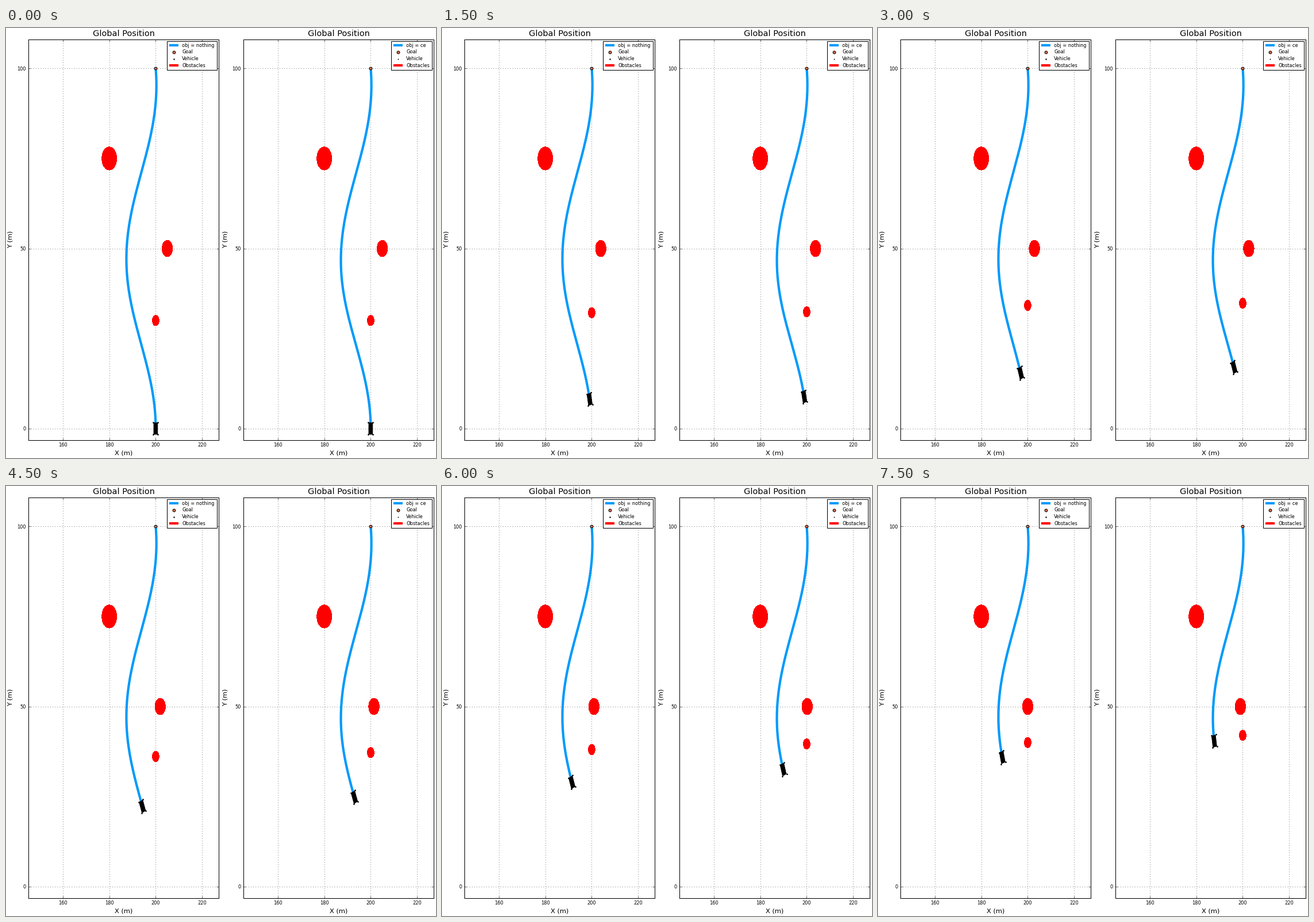
A matplotlib script that plays this animation: 748x748 px, repeating every 8 s.

```python
import numpy as np
import matplotlib.pyplot as plt
from matplotlib.animation import FuncAnimation
from matplotlib.patches import Circle, Polygon, Rectangle

SIZE = 748
FRAMES, STEP = 16, 500
LAST = (FRAMES - 1) * STEP
BLUE, ORANGE, RED = "#009afa", "#e36f47", "#ff0000"

plt.rcParams.update({
    "font.family": "DejaVu Sans",
    "font.size": 8,
    "lines.scale_dashes": False,
    "axes.linewidth": 1.0,
})

fig = plt.figure(figsize=(10, 10), dpi=SIZE / 10, facecolor="white")

# Overlay in pixel coordinates for text and legends
page = fig.add_axes([0, 0, 1, 1], zorder=5)
page.set(xlim=(0, SIZE), ylim=(SIZE, 0))
page.axis("off")


def label(x, y, text, size=8, ha="center", rotation=0):
    page.text(x, y, text, size=size, ha=ha, va="baseline",
              rotation=rotation, rotation_mode="anchor")


def marker(ax, x, y, size, zorder=3):
    ax.plot(x, y, "o", ms=size, mfc=ORANGE, mec="black", mew=1, zorder=zorder)


def legend(x, width, title, dot):
    page.add_patch(Rectangle((x, 22.7), width, 50, fc="white", ec="black", lw=1))
    for i, name in enumerate([title, "Goal", "Vehicle", "Obstacles"]):
        label(x + 26, 32.6 + 11.8 * i, name, ha="left")
    for row, color in ((29.7, BLUE), (65.1, RED)):
        page.plot([x + 3.5, x + 19.7], [row, row], color=color, lw=4,
                  solid_capstyle="butt")
    marker(page, x + 11.7, 41.6, 4.6)
    page.plot(x + 11.7, 53.6, "o", ms=dot, color="black", mew=0)


def progress(u, surge):
    """Linear progress with a slightly faster start."""
    return u + surge * u * (1 - u) ** 2


def rotated(half_w, half_l, angle, center):
    corners = np.array([(-1, -1), (1, -1), (1, 1), (-1, 1)]) * (half_w, half_l)
    c, s = np.cos(angle), np.sin(angle)
    return corners @ np.array([[c, s], [-s, c]]) + center


class Panel:
    def __init__(self, left, title, box_x, box_w, dot,
                 depth, middle, travel, surge, drift, drift_surge):
        self.depth, self.middle = depth, middle
        self.travel, self.surge = travel, surge
        self.drift, self.drift_surge = drift, drift_surge

        ax = fig.add_axes([left / SIZE, 31.4 / SIZE, 331 / SIZE, 696.8 / SIZE])
        ax.set(xlim=(145.2, 227.2), ylim=(-3.15, 108.07),
               xticks=[160, 180, 200, 220], yticks=[0, 50, 100])
        ax.set_axisbelow(True)
        ax.grid(color="black", lw=0.5, ls=(0, (1, 3)))
        ax.tick_params(direction="in", length=4, width=0.5, pad=4,
                       top=True, right=True)

        mid = left + 165.8
        label(mid, 13.8, "Global Position", 14)
        label(mid, 742.8, "X (m)", 11)
        label(left - 28.2, 368.3, "Y (m)", 11, rotation=90)
        legend(box_x, box_w, title, dot)

        self.line, = ax.plot([], [], color=BLUE, lw=4, zorder=2)
        marker(ax, 200, 100, 4.6)
        self.body = ax.add_patch(Polygon([(0, 0)] * 4, fc="black", ec="black",
                                         lw=0.8, zorder=4))
        self.wheels, = ax.plot([], [], "o", ms=2.6, color="black", mew=0, zorder=4)
        self.rocks = [
            ax.add_patch(Circle(pos, r, fc=RED, lw=0, antialiased=False, zorder=5))
            for pos, r in (((180, 75), 3.2), ((205, 50), 2.27), ((200, 30), 1.45))
        ]

    def path(self, y):
        """Cosine dip to the left, drifting slightly right towards the goal."""
        half = np.where(y < self.middle, self.middle, 95.2 - self.middle)
        dip = (1 + np.cos(np.pi * (y - self.middle) / half)) / 2
        return 200 - self.depth * dip + 0.0032 * y

    def update(self, u):
        y = self.travel * progress(u, self.surge)
        ahead = np.linspace(y, 100, 160)
        self.line.set_data(self.path(ahead), ahead)

        center = (self.path(y), y)
        angle = np.arctan((self.path(y - 0.1) - self.path(y + 0.1)) / 0.2)
        self.body.set_xy(rotated(0.84, 1.6, angle, center))
        self.wheels.set_data(*rotated(0.98, 1.68, angle, center).T)

        moved = self.drift * progress(u, self.drift_surge)
        self.rocks[1].center = (205 - moved / 2, 50)
        self.rocks[2].center = (200, 30 + moved)


panels = [
    Panel(39.2, "obj = nothing", 280.2, 87, 2.4, depth=12.78, middle=47.2,
          travel=35.9, surge=0.21, drift=10, drift_surge=0.15),
    Panel(413.2, "obj = ce", 670.2, 71, 1.8, depth=13, middle=46.8,
          travel=40.4, surge=0.15, drift=12, drift_surge=0),
]


def update(i):
    for panel in panels:
        panel.update(i * STEP / LAST)
    return []


anim = FuncAnimation(fig, update, frames=FRAMES, interval=STEP,
                     repeat=True, repeat_delay=0, blit=False)
plt.show()
```
